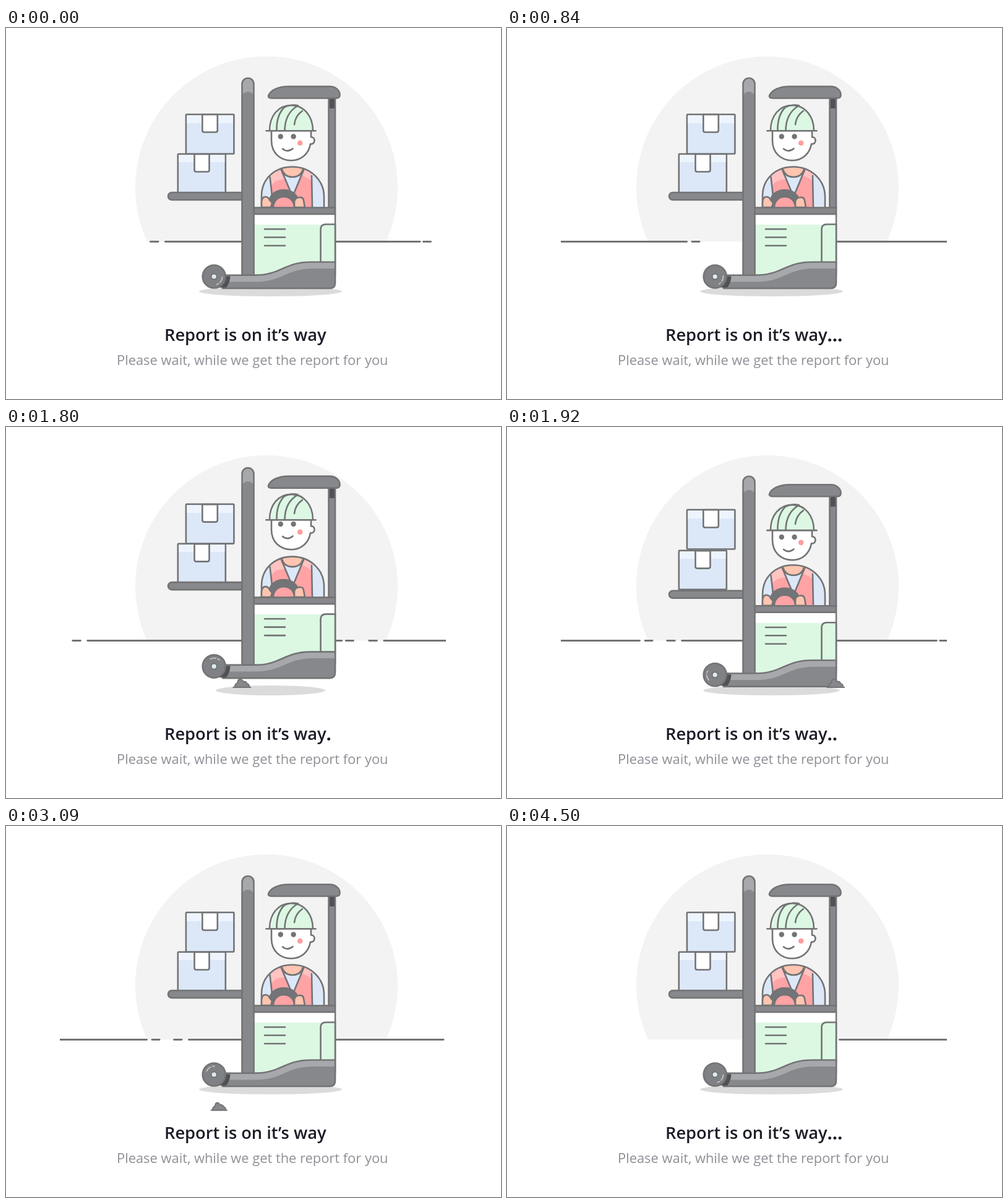
Animation of 800 by 600 pixels, one loop 4530 ms. Source, as an HTML page:

```html
<!DOCTYPE html>
<html lang="en">
<head>
<meta charset="utf-8">
<title>Report is on its way</title>
<style>
html, body { margin: 0; width: 100%; height: 100%; overflow: hidden; background: #fff; }
svg { display: block; width: 800px; height: 600px; }
text { font-family: "Open Sans", sans-serif; }
.ink { stroke: #737375; stroke-width: 2.6; stroke-linecap: round; stroke-linejoin: round; }
.line { fill: none; }
.steel { fill: #87888b; }
.shine { fill: #a7a8ab; }
.dark { fill: #505155; }
.blue { fill: #dce8f8; }
.pale { fill: #eef4fd; }
.green { fill: #dcf8e3; }
.mint { fill: #f0fcf3; }
.red { fill: #ffa3a5; }
.pink { fill: #ffc3c2; }
.skin { fill: #ffc5b0; }
.white { fill: #fff; }
.ground { stroke-width: 2.8; fill: none; }
</style>
</head>
<body>
<svg viewBox="0 0 800 600">
  <defs>
    <clipPath id="stage"><rect x="87" y="0" width="624" height="600"/></clipPath>
    <clipPath id="torsoClip"><path d="M413 291V272C413 243 435 224.500 463 224.500S514 245 514 273V291Z"/></clipPath>
    <clipPath id="helmetClip"><path d="M426 166C426 142 440 125 461 125S496 143 496 166Z"/></clipPath>
    <clipPath id="mastClip"><path d="M381.500 400V90.500a9.500 9.500 0 0 1 19 0V400Z"/></clipPath>
  </defs>

  <path d="M228 345.500A212 212 0 1 1 614 345.500Z" fill="#f3f3f3"/>
  <g clip-path="url(#stage)">
    <path id="road" class="ink ground"/>
    <g id="back"></g>
  </g>
  <ellipse id="shadow" cx="0" cy="0" rx="115.500" ry="8" fill="#dcdbdc"/>

  <g id="low" class="ink">
    <rect class="blue" x="277.800" y="203.800" width="77" height="63" rx="1"/>
    <path class="pale" stroke="none" d="M279.200 205.200H353.400V217H279.200Z"/>
    <path class="white" d="M304.500 204V229.500q0 3 3 3H325.500q3 0 3-3V204Z"/>
  </g>
  <g id="high" class="ink">
    <rect class="blue" x="290.900" y="139.800" width="77.500" height="63.700" rx="1"/>
    <path class="pale" stroke="none" d="M292.300 141.200H367V154H292.300Z"/>
    <path class="white" d="M317.300 140V165.500q0 3 3 3H338.800q3 0 3-3V140Z"/>
  </g>

  <g id="truck" class="ink">
    <path class="steel" d="M382 266H268a6 6 0 0 0 0 12H382Z"/>

    <g clip-path="url(#torsoClip)" stroke="none">
      <path class="blue" d="M410 220H517V292H410Z"/>
      <path class="pale" d="M486 220H517V268Q511 241 486 234Z"/>
      <path class="red" d="M426 220H444L460 266 465 266 482 220H494L495 292H429Z"/>
      <path class="pink" d="M426 220H444L450 245Q434 244 427 258ZM482 220H494L495 249Q487 240 475 238Z"/>
      <path class="blue" d="M444 228L460 266H465L481 228Z"/>
      <path class="skin" d="M446 220V229Q450 241 463 241T480 229V220Z"/>
    </g>
    <path class="line" d="M426.500 241L430.500 275M494 239L495 290M444.500 228.500L459.500 264M481.500 228.500L466 266M446 229Q450 241 463 241T480 229"/>
    <path class="line" d="M413 290V272C413 243 435 224.500 463 224.500S514 245 514 273V290"/>
    <path class="red" stroke="none" d="M432 290a17 17 0 0 1 34 0Z"/>
    <path class="dark" style="fill:#737477" d="M424.500 290V284C426 269 436 262 449 262S472 270 473.500 283V290H466C466 280 459 273 449 273S432 280 432 290Z"/>
    <path class="skin" d="M413 290V281Q414 273 419 273Q424 273 426 278L430 283 428 290ZM466 290V280Q468 274 474 274Q480 273 481 279L483 290Z"/>

    <path class="steel" d="M521.500 112H532V292H521.500Z"/>
    <path class="dark" stroke="none" d="M523 114H530.700V130H523Z"/>
    <path class="steel" d="M424.500 108.500C428 101 439 94.500 457 94.500H523C533 94.500 539.500 101 539.500 108Q539.500 113.500 534 113.500H429Q422.500 113.500 424.500 108.500Z"/>

    <path class="green" d="M400 301H532V400H400Z"/>
    <path class="white" stroke="none" d="M401 302H530.700V318H401Z"/>
    <path class="green" d="M508.500 380V326Q508.500 317.500 517 317.500H532V380Z"/>
    <path class="line" d="M418 325.200H451M418 338.500H451M418 352H451"/>
    <path class="steel" d="M400 290.500H532V301H400Z"/>

    <path class="steel" d="M381.500 400V90.500a9.500 9.500 0 0 1 19 0V400Z"/>
    <path class="shine" stroke="none" clip-path="url(#mastClip)" d="M382.800 107V90.500a8.200 8.200 0 0 1 16.400 0V107Q391 99 382.800 107Z"/>

    <path class="steel" d="M350 399.800H402C444 399.800 449 378.500 493 378.500H532V412Q532 421 523 421H350Z"/>
    <path class="shine" stroke="none" d="M360 401.100H402C445 401.100 450 379.800 493 379.800H530.700V389H496C453 389 447 410.500 403 410.500H360Z"/>
    <path class="dark" stroke="none" d="M348 401.500H362.500Q362 412 356 419.800H345Z"/>
    <circle class="steel" style="fill:#808184" cx="336.200" cy="402" r="18.500"/>
    <circle class="white" style="fill:#dcecf3" cx="336.200" cy="402" r="4.600" stroke-width="2"/>
    <g id="spin" class="line" style="stroke:#c9cacc;stroke-width:1.500">
      <path d="M349.400 402.600A13.400 13.400 0 0 1 346 411.200M343.700 413.200A13.400 13.400 0 0 1 340.500 414.800"/>
    </g>
  </g>

  <g id="head" class="ink">
    <path class="white" d="M429 166V182C429 202 443 214.300 461 214.300C477 214.300 489 204 492 187.500C500.500 189 500.500 175.500 493 176.500V166Z"/>
    <g id="face">
      <circle cx="443.800" cy="175.500" r="4.200" fill="#737375" stroke="none"/>
      <circle cx="464.600" cy="175.500" r="4.200" fill="#737375" stroke="none"/>
      <path class="line" d="M447 195.500Q455 202 463.500 195"/>
    </g>
    <circle cx="475.200" cy="186" r="4.300" fill="#ff9d9d" stroke="none"/>
    <g clip-path="url(#helmetClip)" stroke="none">
      <path class="green" d="M420 120H500V167H420Z"/>
      <path class="mint" d="M480 128Q494 143 497 167H500V120ZM420 166V140L442 126Q430 144 429 166Z"/>
    </g>
    <path class="line" d="M426 166C426 142 440 125 461 125S496 143 496 166"/>
    <path class="line" d="M437.500 165Q437 141 450 128M450.500 165Q451 138 471 126M466 156Q467.500 142 479 134M450 128Q461 122.500 472 125.500"/>
    <path class="line" d="M420.500 166.300H500.500"/>
  </g>

  <g id="front" clip-path="url(#stage)"></g>

  <text x="256" y="506" font-size="27.250" font-weight="600" fill="#1b1c26">Report is on it’s way</text>
  <text id="dots" x="517.500" y="507.300" font-size="29" font-weight="700" fill="#1b1c26"></text>
  <text x="179" y="545" font-size="21.870" fill="#8f9097">Please wait, while we get the report for you</text>
</svg>
<script>
const LOOP = 4530, STEP = 30, SPEED = 1.2575;
const get = id => document.getElementById(id);

// each strip of road: [time, left end at that time]
const strips = [
  [0, 232], [840, 410], [840, -145], [1620, 359], [1620, -120], [1920, -221],
  [3090, 761], [3090, 270], [3090, -208], [3660, 32], [4500, 512]
];

// time and middle at that time, base line, scale, layer
const stones = [
  { t: 1620, x: 156.5, y: 421, k: 1, layer: "front" },
  { t: 3090, x: 344.3, y: 459.7, k: .92, layer: "front" },
  { t: 3660, x: 232, y: 345.5, k: .88, layer: "back" }
];
for (const s of stones) {
  get(s.layer).insertAdjacentHTML("beforeend",
    `<g class="ink" style="stroke-width:2"><path class="steel"
     d="M-12 0Q-11-6-7-7Q-7-13-2.500-13.500Q0-13 2-9.500Q7-10 8-6Q12-5 12 0Z"/><path d="M-14 0H14"/></g>`);
  s.el = get(s.layer).lastElementChild;
}

// one hop as the wheels cross the first stone, 0 to 1
function hop(t) {
  const u = (t - 1740) / 195;
  return u > 0 && u < 1 ? Math.sin(Math.PI * u) ** 2 : 0;
}

function move(id, y) {
  get(id).setAttribute("transform", `translate(0 ${y})`);
}

// dash, long line, dash; the last gap narrows on the way
function strip([t0, x0], t) {
  const x = x0 + SPEED * (t - t0);
  if (x > 720 || x < -380) return "";
  const close = 1.5 * Math.min(1, Math.max(0, (x + 120) / 350));
  const seg = (a, b) => `M${x + a + 1.4} 345.500H${x + b - 1.4}`;
  return seg(0, 15.5) + seg(24, 437 + close) + seg(442.5 - close, 457.5 - close);
}

function draw(t) {
  get("road").setAttribute("d", strips.map(s => strip(s, t)).join(""));
  for (const s of stones) {
    const x = s.x + 1.249 * (t - s.t);
    s.el.setAttribute("transform", `translate(${x} ${s.y}) scale(${s.k})`);
    s.el.setAttribute("visibility", x > 60 && x < 740 ? "visible" : "hidden");
  }

  const up = hop(t), late = hop(t - 19);
  const nod = late - up;
  move("truck", -22 * up);
  move("low", -22 * Math.max(up, hop(t - 12)));
  move("high", -22 * Math.max(up, late));
  move("head", 4 * nod - 22 * Math.min(up, hop(t + 15)));
  move("face", 8 * nod);
  const size = 1 - .4 * hop(t - 6);
  get("shadow").setAttribute("transform", `translate(427.500 426) scale(${size} 1)`);

  const turn = -Math.min(t * 26 / 30, 3600);
  get("spin").setAttribute("transform", `rotate(${turn} 336.200 402)`);

  const beat = t < 4500 ? t % 1500 : 1500;
  const count = [110, 400, 805].filter(b => beat >= b).length;
  get("dots").textContent = ".".repeat(count);
}

function tick() {
  const t = performance.now() % LOOP;
  draw(Math.floor(t / STEP) * STEP);
  requestAnimationFrame(tick);
}
tick();
</script>
</body>
</html>
```
